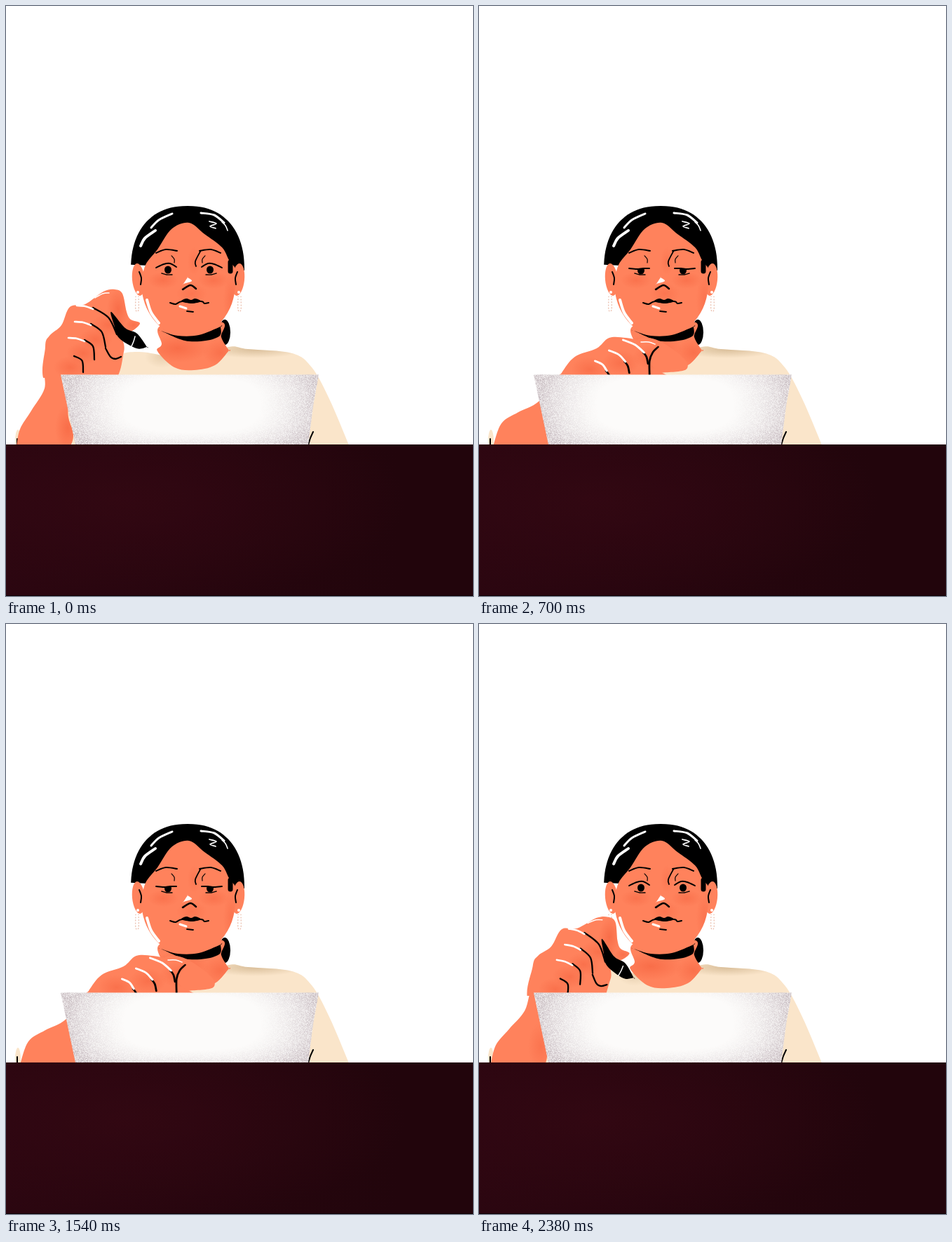
An HTML page with a canvas that plays this animation: 666x841 px, repeating every 2520 ms.

```html
<!DOCTYPE html>
<html lang="en">
<head>
<meta charset="utf-8">
<title>Drawing at the desk</title>
<style>
html, body { margin: 0; width: 100%; height: 100%; overflow: hidden; background: #fff; }
canvas { display: block; }
</style>
</head>
<body>
<canvas id="stage" width="666" height="841"></canvas>
<script>
const W = 666, H = 841, STEP = 140, STEPS = 18;
const DESK = 625, PAPER = 525.5, MID = 260;
const SKIN = '#ff825c', RED = '#f4603c', INK = '#000', SHIRT = '#fae5ca', WHITE = '#fff';

const stage = document.getElementById('stage').getContext('2d');
let g = stage;

const clamp = v => Math.max(0, Math.min(1, v));
const nums = s => typeof s === 'string' ? s.split(' ').map(Number) : s;

function mix(a, b, t) {
  const q = nums(b);
  return nums(a).map((v, i) => v + (q[i] - v) * t);
}

// Smooth curve through key points; a doubled point makes a corner.
function curve(s, closed) {
  const p = nums(s), n = p.length / 2;
  const at = i => {
    i = closed ? (i + n) % n : Math.max(0, Math.min(n - 1, i));
    return [p[2 * i], p[2 * i + 1]];
  };
  const path = new Path2D();
  path.moveTo(p[0], p[1]);
  for (let i = 0; i < (closed ? n : n - 1); i++) {
    const [a, b, c, d] = [at(i - 1), at(i), at(i + 1), at(i + 2)];
    path.bezierCurveTo(
      b[0] + (c[0] - a[0]) / 6, b[1] + (c[1] - a[1]) / 6,
      c[0] - (d[0] - b[0]) / 6, c[1] - (d[1] - b[1]) / 6, c[0], c[1]);
  }
  return path;
}

function fill(color, shape) {
  g.fillStyle = color;
  g.fill(shape instanceof Path2D ? shape : curve(shape, true));
}

function line(color, width, points) {
  g.strokeStyle = color;
  g.lineWidth = width;
  g.lineCap = g.lineJoin = 'round';
  g.stroke(curve(points, false));
}

function oval(color, x, y, rx, ry, turn = 0) {
  const path = new Path2D();
  path.ellipse(x, y, rx, ry, turn, 0, 2 * Math.PI);
  fill(color, path);
}

function glow(color, x, y, rx, ry, alpha) {
  g.save();
  g.translate(x, y);
  g.scale(rx, ry);
  const r = g.createRadialGradient(0, 0, 0, 0, 0, 1);
  r.addColorStop(0, color);
  r.addColorStop(1, color + '00');
  g.globalAlpha = alpha;
  g.fillStyle = r;
  g.fillRect(-1, -1, 2, 2);
  g.restore();
}

// Fills a shape and paints shading inside it.
function shaded(color, shape, shade) {
  const path = shape instanceof Path2D ? shape : curve(shape, true);
  fill(color, path);
  g.save();
  g.clip(path);
  shade();
  g.restore();
}

function layer(draw) {
  const c = document.createElement('canvas');
  c.width = W;
  c.height = H;
  g = c.getContext('2d');
  draw();
  g = stage;
  return c;
}

function randomizer(seed) {
  return () => (seed = (seed * 16807) % 2147483647) / 2147483647;
}

function drawBody() {
  shaded(SHIRT, '95 630 95 630 90 560 150 505 190 493 268 505 317 486 345 489 408 495 436 515 461 560 490 628 490 628', () => {
    glow('#cdb088', 355, 489, 70, 13, .75);
    glow('#cdb088', 222, 500, 24, 16, .4);
  });
  oval(SHIRT, 17, 620, 4, 16);
  line(INK, 2, '438 607 434 616 431 626');
  line(INK, 2, '16 617 16 626');
  oval(INK, 312, 465, 8, 18);
  shaded(SKIN, '222 455 222 482 216 492 240 515 268 519 298 512 318 491 318 491 307 472 306 450', () => {
    glow(RED, 245, 488, 45, 20, .6);
    glow(RED, 306, 494, 25, 20, .5);
  });
}

function drawHair() {
  const dome = new Path2D();
  for (let a = 0; a <= 1.001; a += .02) {
    const c = Math.cos(a * Math.PI), s = Math.sin(a * Math.PI);
    dome.lineTo(259 + 81 * Math.sign(c) * Math.abs(c) ** .87, 377 - 92 * s ** .87);
  }
  fill(INK, dome);
  line(WHITE, 4, '192 342 198 331 213 320');
  line(WHITE, 3, '207 316 218 305 237 296');
  line(WHITE, 3, '278 295 297 298 311 309');
  line(WHITE, 1.6, '308 308 313 313 316 320');
  line(WHITE, 1.8, '290 307 300 310 291 314 299 317');
}

function drawFace() {
  const face = curve('193 395 199 369 216 347 236 318 261 309 283 325 308 344 318 362 326 372', false);
  face.ellipse(MID, 395, 67, 77, 0, 0, Math.PI);
  shaded(SKIN, face, () => {
    for (const s of [-1, 1]) glow(RED, MID + s * 36, 391, 22, 12, .45);
    glow(RED, 268, 364, 9, 20, .3);
    glow(RED, 265, 410, 22, 14, .35);
    glow(RED, 322, 420, 12, 40, .4);
  });
  line(INK, 7, '320 365 320 378');
  fill(INK, '221 463 221 463 245 470 275 469 306 457 306 457 305 470 285 477 255 477');

  line(INK, 1.8, '277 350 270 364 271 371');
  fill(WHITE, '253 396 253 396 259 387 259 387 265 392');
  line(INK, 2.6, '252 404 263 398 271 403');
  line(INK, 2, '234 423 242 425 251 421 278 421 283 424 289 423');
  fill(INK, '250 421 257 417 264 419 270 417 278 421 265 424');
  line(WHITE, 3, '248 428 257 431');
  line(INK, 1.8, '258 435 267 436');
  line(WHITE, 4, '201 419 207 437 218 452');
}

function drawHead() {
  drawHair();
  for (const s of [-1, 1]) oval(SKIN, MID + s * 71, 390, 9, 23, s * .1);
  drawFace();
  for (const s of [-1, 1]) {
    const x = d => MID + s * d;
    line(INK, 2, [x(70), 379, x(67), 388, x(68), 397]);
    line(INK, 2, [x(16), 349, x(32), 347, x(46), 352]);
    line(INK, 1.2, [x(24), 356, x(20), 361, x(20), 366]);
    oval(WHITE, x(72), 408, 2, 2);
    g.setLineDash([1, 3]);
    line('#e9b9a6', 1.2, [x(75), 414, x(75), 433, x(71), 433, x(71), 414]);
    g.setLineDash([]);
  }
}

function drawPaper() {
  const rnd = randomizer(77);
  g.save();
  g.clip(new Path2D(`M78 ${PAPER}H446L438 570L431 ${DESK}H99Z`));
  g.fillStyle = '#fcfbfa';
  g.fillRect(70, 520, 380, 110);
  g.fillStyle = '#b3a3aa';
  for (let y = 525; y < DESK; y++) {
    for (let x = 78; x < 447; x++) {
      const u = Math.abs(x - 265) / 180, v = Math.abs(y - 568) / 57;
      g.globalAlpha = clamp((u ** 3 + .5 * v ** 3 - .15) / .85) * (.15 + rnd() * .6);
      g.fillRect(x, y, 1, 1);
    }
  }
  g.restore();
}

function drawDesk() {
  drawPaper();
  const wood = g.createLinearGradient(0, 0, 560, 0);
  wood.addColorStop(0, '#2b0610');
  wood.addColorStop(1, '#22050c');
  g.beginPath();
  g.rect(0, DESK, W, H - DESK);
  g.clip();
  g.fillStyle = wood;
  g.fillRect(0, DESK, W, H - DESK);
  glow('#340813', 170, 705, 400, 150, .8);
  g.fillStyle = '#0c0104';
  g.fillRect(0, H - 1, W, 1);
}

function drawEyes(shut) {
  const top = 367 + shut * 7;
  for (const s of [-1, 1]) {
    const x = d => MID + 1 + s * d;
    g.save();
    g.beginPath();
    g.rect(x(30) - 10, top, 20, 20);
    g.clip();
    oval(INK, x(30), 376 + shut, 5, 5.5);
    g.restore();
    line(INK, 1.9, [x(18), 372 + shut * 2, x(27), top, x(36), top + 1, x(47), 373 + shut]);
    line(INK, 1.4, [x(24), 383, x(32), 383, x(39), 381]);
  }
}

// Forearm, from raised (0) to resting (1).
function drawArm(down) {
  const arm = mix(
    '60 505 55 545 36 577 20 603 15 628 15 628 92 628 92 628 96 610 90 570 130 505',
    '125 520 86 563 56 579 32 595 20 628 20 628 100 628 100 628 100 610 100 570 130 525', down);
  shaded(SKIN, arm, () => glow(RED, 88, 602, 18, 34, .6 * (1 - down)));
}

// Hand with the pen; it turns and sinks as the pose advances.
function drawRaised(pose) {
  g.save();
  g.beginPath();
  g.rect(0, 0, W, 530);
  g.clip();
  g.translate(97 + 27 * pose, 427 + 7 * pose * pose);
  g.rotate(.113 * pose);
  g.translate(-97, -427);
  const hand = '60 540 56 486 62 470 79 455 91 429 113 425 139 407 155 404 166 410 172 436 178 447 191 452 180 463 165 468 168 493 147 540';
  shaded(SKIN, hand, () => {
    glow(RED, 160, 432, 16, 28, .6);
    glow(RED, 182, 455, 12, 9, .5);
    for (let k = 0; k < 4; k++) glow(RED, 146 - 18 * k, 455 + 20 * k, 24, 16, .5);
  });
  fill(INK, '150 436 170 459 187 467 201 486 201 486 186 488 161 473 154 454');
  line(WHITE, 1.5, '184 471 182 478 179 485');
  for (let k = 0; k < 4; k++) {
    const x = 124 - 3 * k * k, y = 430 + 23 * k;
    const endX = 158 - 16 * k, endY = 468 + 18 * k;
    line(INK, 2.3, [x, y, (x + endX) / 2 + 5, (y + endY) / 2 - 5, endX, endY]);
    if (k < 3) line(WHITE, 2.6, [x - 23, y - 3, x - 11, y - 2, x, y + 2]);
  }
  line(INK, 2.3, '142 488 149 500 156 503 164 500');
  line(WHITE, 1.5, '127 416 138 410 147 409');
  g.restore();
}

// Writing hand; t widens it towards the right.
function drawWriting(t) {
  g.save();
  g.translate(140, 0);
  g.scale(1 + .11 * t, 1);
  g.translate(-140, 0);
  fill(SKIN, '215 480 240 475 275 500 280 518 248 523 230 526');
  shaded(SKIN, '112 540 120 523 137 500 165 488 181 473 203 473 222 477 246 482 241 492 233 506 240 517 262 540', () => {
    for (let k = 0; k < 3; k++) glow(RED, 236 - 40 * k, 500 + 9 * k, 24, 18, .5);
  });
  line(INK, 2.5, '244 486 237 494 233 506 233 526');
  for (let k = 0; k < 3; k++) {
    const x = 199 - 18 * k, y = 476 + 15 * k;
    const endX = 226 - 24 * k, endY = 494 + 13 * k;
    line(INK, 2.5, [endX - 1, endY, endX + 3, endY + 6, endX + 5, endY + 16]);
    line(WHITE, 2.8, [x, y, (x + endX) / 2 + 2, (y + endY) / 2 - 2, endX, endY]);
  }
  line(WHITE, 1.5, '222 479 232 479 240 482');
  g.restore();
}

const body = layer(() => { drawBody(); drawHead(); });
const desk = layer(drawDesk);

// Poses 0-2 lower the pen; 3-6 write with lowered eyes, twice back and forth.
function poseAt(step) {
  const s = Math.min(step, STEPS - step);
  return s <= 6 ? s : 12 - s;
}

function draw(pose) {
  const write = Math.max(0, pose - 3) / 2;
  g.fillStyle = WHITE;
  g.fillRect(0, 0, W, H);
  g.drawImage(body, 0, 0);
  drawEyes(Math.min(1.1, write));
  drawArm(clamp(pose / 3));
  if (pose < 3) drawRaised(pose);
  else drawWriting(write);
  g.drawImage(desk, 0, 0);
}

const start = performance.now();
function tick() {
  const step = Math.floor((performance.now() - start) / STEP) % STEPS;
  draw(poseAt(step));
  requestAnimationFrame(tick);
}
tick();
</script>
</body>
</html>
```
